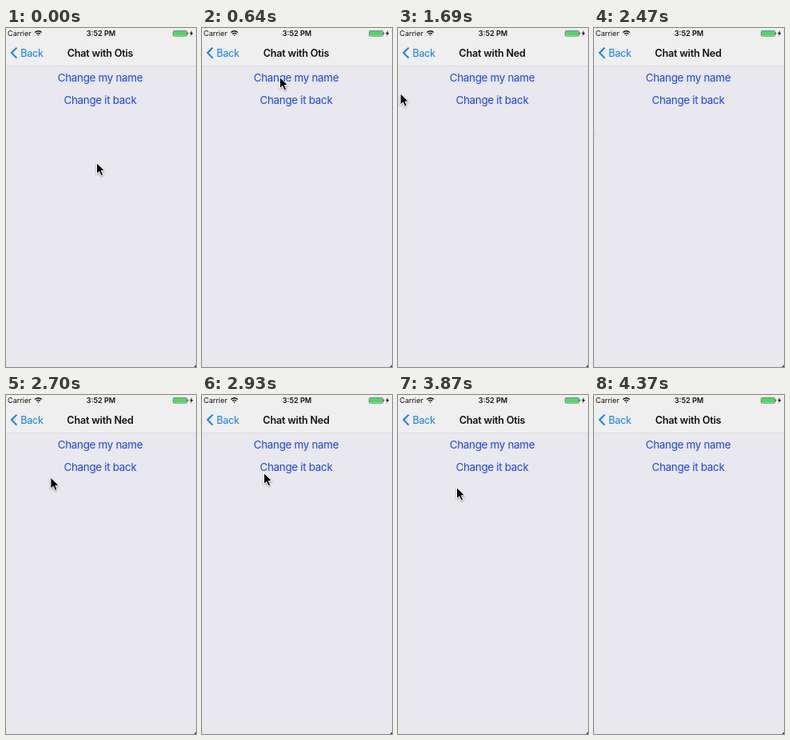
Animation, 238 px wide and 424 px high, one loop 4.79 s. Source, as an HTML page:

```html
<!DOCTYPE html>
<html>
<head>
<meta charset="utf-8">
<style>
html, body { margin: 0; width: 100%; height: 100%; overflow: hidden; background: #e9e8ee; }
svg { display: block; width: 100vw; height: 100vh; font-family: Inter, Roboto, sans-serif; }
.mid { text-anchor: middle; }
.button { font-size: 13.4px; letter-spacing: -.3px; fill: #1543ff; }
.title { font-size: 12.6px; letter-spacing: -.2px; font-weight: 600; fill: #111; }
.back { font-size: 12.6px; letter-spacing: -.2px; fill: #0a7cff; }
.status { font-size: 9.1px; fill: #111; }
.shadow { filter: drop-shadow(0 1px .8px rgba(0, 0, 0, .35)); }
</style>
</head>
<body>
<svg viewBox="0 0 238 424">
  <rect width="238" height="424" fill="#e9e8ee"/>
  <rect width="238" height="47" fill="#efeff0"/>
  <rect y="47" width="238" height="1" fill="#dcdcdf"/>
  <path d="M238 421V424H235Q237.4 423.4 238 421Z" fill="#222"/>

  <text class="status" x="2" y="10">Carrier</text>
  <g fill="none" stroke="#111" stroke-width="1.3">
    <path d="M36.2 5.6Q40.5 1.8 44.8 5.6M38 7.5Q40.5 5.3 43 7.5"/>
    <path d="M39.3 8.7L40.5 10L41.7 8.7Q40.5 7.8 39.3 8.7Z" fill="#111" stroke="none"/>
  </g>
  <text class="status mid" x="119" y="10" font-weight="600">3:52 PM</text>
  <rect x="209.4" y="3.4" width="17.2" height="6.8" rx="1.2" fill="#efeff0" stroke="#333" stroke-width=".6"/>
  <rect x="210" y="4" width="16" height="5.6" rx=".6" fill="#4cd964"/>
  <path d="M227.4 5.5h.6q.7 1.3 0 2.6h-.6Z" fill="#222"/>
  <path d="M233 3L230 7.2H232L231.2 10.4L234.4 6H232.4Z" fill="#111"/>

  <path d="M13.4 24.6L7 31.1L13.4 37.6" fill="none" stroke="#0a7cff" stroke-width="2"/>
  <text class="back" x="18.2" y="35.9">Back</text>
  <text class="title mid" id="title" x="118" y="35.9"></text>
  <text class="button mid" id="change" x="118" y="66.8">Change my name</text>
  <text class="button mid" id="revert" x="118" y="94.8">Change it back</text>

  <g id="cursor"><path class="shadow" d="M.5 .5V14.6L3.8 11.6L6.1 16.8L8.7 15.7L6.4 10.6H10.8Z"
    fill="#000" stroke="#fff" stroke-width="1"/></g>
</svg>
<script>
const LOOP = 4790;
const PRESS_CHANGE = 1180, PRESS_REVERT = 3410, HOLD = 110;
const $ = id => document.getElementById(id);

const speedUp = k => k * k;
const slowDown = k => 1 - (1 - k) ** 2;
const smooth = k => k * k * (3 - 2 * k);
const progress = (t, begin, end) => Math.min(1, Math.max(0, (t - begin) / (end - begin)));

// Each glide starts where the last one ended, unless it has its own "from"
const glides = [
  { begin: 360, end: 640, to: [97, 61], ease: smooth },
  { begin: 1350, end: 1750, to: [-33, 89], ease: speedUp },
  { begin: 2470, end: 2930, from: [-10, 120], to: [77, 97], ease: slowDown },
  { begin: 2930, end: 3170, to: [80, 92], ease: slowDown },
  { begin: 3580, end: 3870, to: [73, 115], ease: smooth },
  { begin: 3870, end: 3920, to: [80, 268], ease: smooth },
  { begin: 3920, end: 4370, to: [205, 450], ease: smooth }
];

function cursorAt(t) {
  let spot = [113, 168];
  for (const { begin, end, from, to, ease } of glides) {
    if (t < begin) break;
    const start = from ?? spot;
    const k = ease(progress(t, begin, end));
    spot = start.map((v, i) => v + (to[i] - v) * k);
  }
  return spot;
}

// A button dims at once when pressed and fades back after release
const buttonAlpha = (t, press) =>
  t < press ? 1 : .2 + .8 * smooth(progress(t, press + 175, press + 450));

function draw(now) {
  const t = now % LOOP;
  const renamed = t >= PRESS_CHANGE + HOLD && t < PRESS_REVERT + HOLD;
  $('title').textContent = 'Chat with ' + (renamed ? 'Ned' : 'Otis');
  $('change').style.opacity = buttonAlpha(t, PRESS_CHANGE);
  $('revert').style.opacity = buttonAlpha(t, PRESS_REVERT);
  $('cursor').setAttribute('transform', `translate(${cursorAt(t)})`);
  requestAnimationFrame(draw);
}
draw(0);
</script>
</body>
</html>
```
